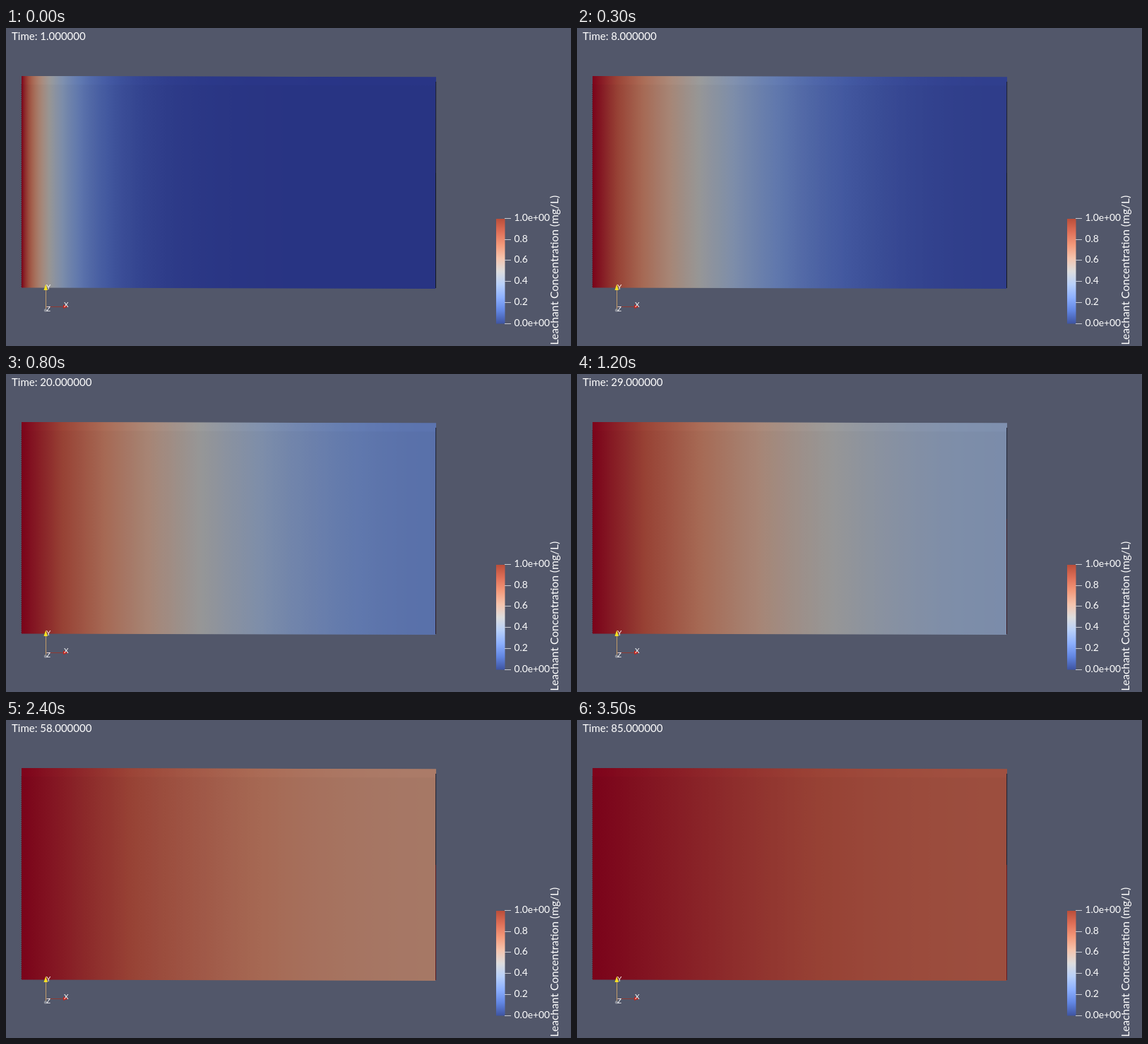
Recreate the animation shown at these times as an HTML page with a canvas. Size 800 by 450 pixels, loop 3600 ms.

```html
<!DOCTYPE html>
<html lang="en">
<head>
<meta charset="utf-8">
<title>Leachant diffusion</title>
<style>
html, body { margin: 0; height: 100%; overflow: hidden; background: #52576a; }
canvas { display: block; }
</style>
</head>
<body>
<canvas id="stage" width="800" height="450"></canvas>
<script>
const g = document.getElementById('stage').getContext('2d');
const LOOP = 3600, STEP = 100;
const LEFT = 22, RIGHT = 609, CELLS = 120, DIFFUSION = 3400;

// Cool-to-warm map, evenly spaced from 0 to 1
const MAP = [
  [59, 76, 192], [98, 130, 234], [141, 176, 254], [184, 208, 249], [221, 221, 221],
  [245, 196, 173], [244, 154, 123], [222, 96, 77], [180, 4, 38]
];
// The legend has softer ends
const LEGEND = [[62, 84, 160], [98, 134, 226], ...MAP.slice(2, 7), [224, 112, 88], [186, 78, 58]];

const rgb = (parts, light = 1) => `rgb(${parts.map(v => Math.round(v * light))})`;

function colour(c, light) {
  const p = Math.min(Math.max(c, 0), 1) * 8, i = Math.min(Math.floor(p), 7);
  return rgb(MAP[i].map((v, k) => v + (MAP[i + 1][k] - v) * (p - i)), light);
}

// One implicit diffusion step: fixed concentration at left, closed wall at right
function diffuse(old) {
  const h = (RIGHT - LEFT) / CELLS, r = DIFFUSION / (h * h);
  const up = [0], rhs = [1], next = [];
  for (let i = 1; i <= CELLS; i++) {
    const low = i === CELLS ? 2 * r : r;
    const m = 1 + 2 * r - low * up[i - 1];
    up[i] = r / m;
    rhs[i] = (old[i] + low * rhs[i - 1]) / m;
  }
  next[CELLS] = rhs[CELLS];
  for (let i = CELLS - 1; i >= 0; i--) next[i] = rhs[i] + up[i] * next[i + 1];
  return next;
}

const states = [Array.from({ length: CELLS + 1 }, (_, i) => i ? 0 : 1)];
while (states.length <= 85) states.push(diffuse(states[states.length - 1]));

function shape(fill, ...pts) {
  g.fillStyle = fill;
  g.beginPath();
  for (const [x, y] of pts) g.lineTo(x, y);
  g.fill();
}

function line(stroke, width, x1, y1, x2, y2, dash = []) {
  g.strokeStyle = stroke;
  g.lineWidth = width;
  g.setLineDash(dash);
  g.beginPath();
  g.moveTo(x1, y1);
  g.lineTo(x2, y2);
  g.stroke();
}

function label(text, x, y, size) {
  g.fillStyle = '#fff';
  g.font = `${size}px Lato, sans-serif`;
  g.fillText(text, x, y);
}

function ramp(colours, x1, y1, x2, y2) {
  const grad = g.createLinearGradient(x1, y1, x2, y2);
  colours.forEach((c, i) => grad.addColorStop(i / (colours.length - 1), c));
  return grad;
}

function drawBlock(values) {
  const end = values[CELLS];
  const face = light => ramp(values.map(c => colour(c, light)), LEFT, 0, RIGHT, 0);
  shape(face(0.68), [22, 68], [609, 69.5], [608, 369], [22, 367.5]);
  shape(face(0.7), [22, 68], [609, 69.5], [608, 81.5], [22, 80]);
  line('#4e3040', 1, 21.5, 80, 21.5, 367, [1, 2]);
  line('#1c1f30', 1, 608.7, 76, 608.5, 205);
  line(`rgb(${20 + 100 * end}, 25, 32)`, 1, 608.5, 205, 608.5, 368);
}

function drawLegend() {
  g.fillStyle = ramp(LEGEND.map(c => rgb(c)), 0, 418.5, 0, 270);
  g.fillRect(694, 270, 12.5, 148.5);
  ['0.0e+00', '0.2', '0.4', '0.6', '0.8', '1.0e+00'].forEach((text, i) => {
    const y = Math.round(417.5 - i * 29.7) + 0.5;
    line('#c8cad2', 1, 706, y, 715, y);
    label(text, 719.5, y + 3.5, 13.8);
  });
  g.save();
  g.translate(782, 448.5);
  g.rotate(-Math.PI / 2);
  label('Leachant Concentration (mg/L)', 0, 0, 15.6);
  g.restore();
}

function drawAxes() {
  line('#8f3a33', 1, 57, 394.5, 82, 394.5);
  shape('#c3241c', [81, 391.5], [88, 394.5], [81, 397]);
  line('#c09a68', 1, 56.5, 370, 56.5, 399);
  shape('#f5e023', [53.5, 371], [56.3, 362.5], [59, 371]);
  g.fillStyle = '#8d919c';
  g.beginPath();
  g.arc(56, 399.5, 2.2, 0, 7);
  g.fill();
  label('Y', 57, 369.5, 10);
  label('X', 82, 394.5, 10);
  label('Z', 57, 400.5, 10);
}

function draw(now) {
  const step = Math.floor((now % LOOP) / STEP);
  const time = Math.floor(1 + 2.4 * step + 1e-6);
  g.fillStyle = '#52576a';
  g.fillRect(0, 0, 800, 450);
  drawBlock(states[time]);
  drawLegend();
  drawAxes();
  label(`Time: ${time.toFixed(6)}`, 8, 16.5, 15);
}

const start = performance.now();
function tick() {
  draw(performance.now() - start);
  requestAnimationFrame(tick);
}
tick();
</script>
</body>
</html>
```
